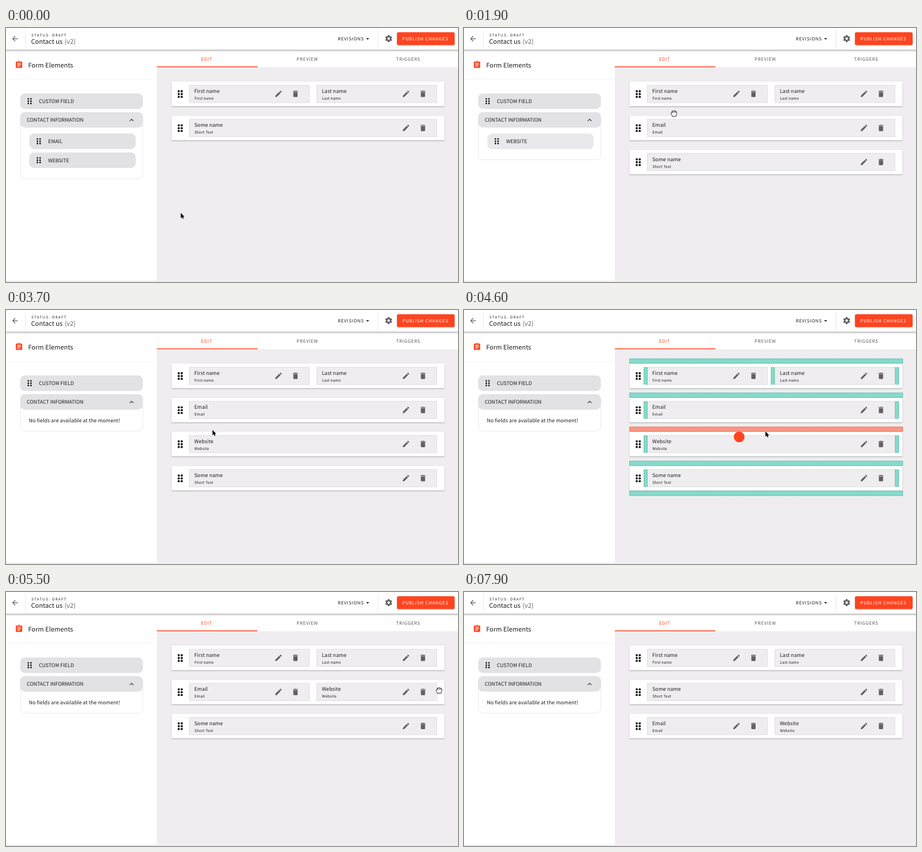
An HTML page with a canvas that plays this animation: 800x450 px, repeating every 8000 ms.

```html
<!DOCTYPE html>
<html lang="en">
<head>
<meta charset="utf-8">
<title>Form builder</title>
<style>
  html, body { margin: 0; height: 100%; overflow: hidden; }
  canvas { display: block; width: 800px; height: 450px; }
</style>
</head>
<body>
<canvas id="stage" width="800" height="450"></canvas>
<script>
const LOOP = 8000, STEP = 100;
const INK = '#1b1b1b', GREY = '#616161', RED = '#ff441f', PILL = '#e2e1e3', PAGE = '#efedef';
const FONT = '"Noto Sans CJK JP", "Noto Sans CJK SC", "Noto Sans CJK", "Noto Sans", sans-serif';
const ctx = document.getElementById('stage').getContext('2d');

const ICONS = {
  back: 'M20 11H7.83l5.59-5.59L12 4l-8 8 8 8 1.41-1.41L7.83 13H20v-2z',
  pencil: 'M3 17.25V21h3.75L17.81 9.94l-3.75-3.75L3 17.25zM20.71 7.04c.39-.39.39-1.02 0-1.41l-2.34-2.34c-.39-.39-1.02-.39-1.41 0l-1.83 1.83 3.75 3.75 1.83-1.83z',
  trash: 'M6 19c0 1.1.9 2 2 2h8c1.1 0 2-.9 2-2V7H6v12zM19 4h-3.5l-1-1h-5l-1 1H5v2h14V4z',
  form: 'M19 3h-4.18C14.4 1.84 13.3 1 12 1s-2.4.84-2.82 2H5c-1.1 0-2 .9-2 2v14c0 1.1.9 2 2 2h14c1.1 0 2-.9 2-2V5c0-1.1-.9-2-2-2zm-7 0c.55 0 1 .45 1 1s-.45 1-1 1-1-.45-1-1 .45-1 1-1zm2 14H7v-2h7v2zm3-4H7v-2h10v2zm0-4H7V7h10v2z',
  up: 'M12 8l-6 6 1.41 1.41L12 10.83l4.59 4.58L18 14z',
  down: 'M7 10l5 5 5-5z'
};
for (const k in ICONS) ICONS[k] = new Path2D(ICONS[k]);
const ARROW = new Path2D('M0 0V9.4L2.1 7.5L3.6 10.8L5.2 10.1L3.8 6.9H6.6Z');
const HAND = new Path2D('M-3 5.4C-3 3.5-5.5 1.5-5.3-.3C-5-1.4-4-1.2-3.3-.5L-3.6-3C-3.5-4.4-1.9-4.4-1.6-3.5C-1.4-5 .5-5 .8-3.8C1-4.8 2.8-4.6 2.8-3.2C3.4-3.9 4.8-3.4 4.8-2C4.9 1 4.5 2 3.6 5.4Z');
const KNUCKLES = new Path2D('M-1.6-3.3V-1M.8-3.6V-1M2.8-3.1V-1');

// Cursor way points: time, x, y
const PATH = [
  [0, 309.3, 327.5], [700, 88, 200], [900, 88, 201], [1800, 371, 150], [2000, 371, 150],
  [2500, 88, 200], [2800, 88, 201], [3500, 365.5, 212.5], [3800, 365.5, 212.5],
  [4300, 462, 236], [4400, 462, 235], [4500, 487, 222], [4600, 533.5, 215],
  [5200, 781, 176], [5400, 766, 173], [5600, 766, 173], [6200, 309, 236], [6300, 309, 236],
  [6400, 310.5, 188], [6500, 311, 186.5], [6800, 311, 151], [7400, 311, 151], [7800, 313, 172]
];
// Drags: start, drop, whole row?
const DRAGS = [[800, 1900], [2600, 3600], [4400, 5500], [6400, 7300, true]];

const lerp = (a, b, k) => a + (b - a) * k;

function cursorAt(t) {
  const i = PATH.findIndex(p => p[0] > t);
  if (i < 0) return PATH[PATH.length - 1].slice(1);
  if (i === 0) return PATH[0].slice(1);
  const a = PATH[i - 1], b = PATH[i];
  let k = (t - a[0]) / (b[0] - a[0]);
  if (b[0] - a[0] > 300) k = k * k * (3 - 2 * k);
  return [lerp(a[1], b[1], k), lerp(a[2], b[2], k)];
}

function rowsAt(t) {
  const name = [['First name'], ['Last name']], some = [['Some name', 'Short Text']];
  const email = ['Email'], site = ['Website'];
  if (t < 1900) return [name, some];
  if (t < 3600) return [name, [email], some];
  if (t < 5500) return [name, [email], [site], some];
  return t < 7300 ? [name, [email, site], some] : [name, some, [email, site]];
}

function rect(x, y, w, h, color, r = 0) {
  ctx.beginPath();
  ctx.roundRect(x, y, w, h, r);
  ctx.fillStyle = color;
  ctx.fill();
}

function outline(x, y, w, h, color, r = 0) {
  ctx.beginPath();
  ctx.roundRect(x, y, w, h, r);
  ctx.strokeStyle = color;
  ctx.lineWidth = 0.8;
  ctx.stroke();
}

function disc(x, y, r, color) {
  ctx.beginPath();
  ctx.arc(x, y, r, 0, 7);
  ctx.fillStyle = color;
  ctx.fill();
}

function shadow(blur, dy, color, draw) {
  ctx.save();
  ctx.shadowBlur = blur;
  ctx.shadowOffsetY = dy;
  ctx.shadowColor = color;
  draw();
  ctx.restore();
}

function text(s, x, y, size = 10, color = INK, gap = 0, weight = 400) {
  ctx.font = `${weight} ${size / 1.118}px ${FONT}`;
  ctx.letterSpacing = gap + 'px';
  ctx.textRendering = 'geometricPrecision';
  ctx.fillStyle = color;
  ctx.fillText(s, x, y);
}

const button = (s, x, y, color) => text(s, x, y, 8.75, color, 0.78, 500);

function icon(name, x, y, color = GREY, scale = 0.625) {
  ctx.save();
  ctx.translate(x, y);
  ctx.scale(scale, scale);
  ctx.translate(-12, -12);
  ctx.fillStyle = color;
  ctx.fill(ICONS[name]);
  ctx.restore();
}

function gear(x, y) {
  ctx.save();
  ctx.translate(x, y);
  for (let i = 0; i < 6; i++) {
    rect(-1.7, -6.2, 3.4, 4, GREY, 0.5);
    ctx.rotate(Math.PI / 3);
  }
  disc(0, 0, 4.7, GREY);
  disc(0, 0, 2.2, '#fff');
  ctx.restore();
}

function grip(x, y, dx, dy, r) {
  for (let i = 0; i < 6; i++) disc(x + (i % 2 - 0.5) * dx, y + ((i >> 1) - 1) * dy, r, '#111');
}

function pill(label, x, y, w, color = PILL) {
  rect(x, y, w, 27.4, color, 8.5);
  grip(x + 16.8, y + 13.7, 4.7, 4.1, 1.45);
  text(label, x + 33.2, y + 17.2);
}

function header() {
  shadow(3, 1, 'rgba(0,0,0,.35)', () => rect(-5, -5, 810, 43.5, '#fff'));
  icon('back', 16, 19);
  rect(34, 4, 0.8, 31, '#e2e2e2');
  text('STATUS: DRAFT', 45, 14.8, 7, INK, 1.4);
  text('Contact us', 44.4, 28, 12.5, INK, 0.05);
  text('(v2)', 103.5, 28, 12.5, '#666', 0.05);
  button('REVISIONS', 587.2, 22, INK);
  icon('down', 640, 19.2, INK, 0.55);
  rect(658.2, 4, 0.8, 31, '#e2e2e2');
  gear(677.3, 18.8);
  shadow(2, 1, 'rgba(0,0,0,.35)', () => rect(692, 7.5, 102, 22.5, RED, 2.5));
  button('PUBLISH CHANGES', 701.4, 22, '#fff');
}

function sidebar(t) {
  rect(0, 39, 267, 408.5, '#fff');
  rect(0, 90.7, 267, 0.8, '#efeff1');
  icon('form', 23, 65, RED);
  text('Form Elements', 39.2, 69.5, 12.5, INK, 0.09);
  pill('CUSTOM FIELD', 25, 116, 217.4);

  const items = t < 1900 ? ['EMAIL', 'WEBSITE'] : t < 3600 ? ['WEBSITE'] : [];
  const bottom = items.length ? 200 + 33.5 * items.length : 214.5;
  outline(25.4, 149.6, 216.8, bottom - 149.6, '#e4e4e8', 8.5);
  rect(25, 149.2, 217.4, 27.4, PILL, 8.5);
  text('CONTACT INFORMATION', 36.8, 166.3, 9.95);
  icon('up', 222.3, 163.2, '#333');
  const held = t >= 800 && t < 2000 || t >= 2600;
  items.forEach((s, i) => pill(s, 41.2, 187 + 33.5 * i, 188.3, held && !i ? '#e9e8ea' : PILL));
  if (!items.length) text('No fields are available at the moment!', 40.4, 198.5, 10, INK, 0.094);
}

function tabs() {
  rect(267, 39, 533, 30.5, '#fff');
  button('EDIT', 345.2, 58, RED);
  button('PREVIEW', 514.3, 58, '#555');
  button('TRIGGERS', 690.5, 58, '#555');
  rect(267, 68, 178, 1.4, RED);
}

function field([title, caption = title], x, y, w) {
  rect(x, y, w, 31.5, PAGE);
  outline(x + 0.4, y + 0.4, w - 0.8, 30.7, '#dcdadd');
  text(title, x + 9.2, y + 14, 10, INK, 0.094);
  text(caption, x + 9.5, y + 26, 7.4, INK, 0.2, 500);
  icon('pencil', x + w - 55, y + 15.6);
  icon('trash', x + w - 25, y + 15.6);
}

function zone(x, y, w, h, [cx, cy]) {
  const hot = cx >= x && cx <= x + w && cy >= y && cy <= y + h;
  rect(x, y, w, h, hot ? '#fb9483' : '#86dacb');
  ctx.setLineDash([1.9, 1.3]);
  outline(x + 0.4, y + 0.4, w - 0.8, h - 0.8, hot ? '#d9604c' : '#3fa998');
  ctx.setLineDash([]);
}

function row(fields, i, last, drag, cursor) {
  const y = 95 + 60.4 * i, pair = fields.length > 1;
  ctx.globalAlpha = drag && drag[2] && last ? 0.4 : 1;
  shadow(2, 1, 'rgba(0,0,0,.3)', () => rect(293, y, 483, 43.5, '#fff', 1));
  grip(308.4, y + 22, 5.3, 5, 1.95);
  fields.forEach((f, k) => field(f, 324 + 225.7 * k, y + 6, pair ? 213.3 : 439));
  if (drag) {
    zone(292.7, y - 9, 484.3, 9, cursor);
    if (last) zone(292.7, y + 44, 484.3, 9, cursor);
    if (!drag[2]) {
      fields.forEach((f, k) => zone(318 + 225.2 * k, y + 6.5, 6.8, 30.5, cursor));
      zone(763, y + 6.5, 6.8, 30.5, cursor);
    }
  }
  ctx.globalAlpha = 1;
}

function pointer(t, [x, y]) {
  if (t >= 7800) return;
  const hand = DRAGS.some(d => t >= d[1] && t < d[1] + (d[2] ? 200 : 100));
  ctx.save();
  ctx.translate(x, y);
  ctx.lineJoin = 'round';
  ctx.lineWidth = 1;
  if (hand) {
    ctx.translate(0.5, 1);
    ctx.fillStyle = '#fff';
    ctx.strokeStyle = '#222';
    ctx.fill(HAND);
    ctx.stroke(HAND);
    ctx.stroke(KNUCKLES);
  } else {
    ctx.fillStyle = '#000';
    ctx.strokeStyle = '#fff';
    ctx.stroke(ARROW);
    ctx.fill(ARROW);
  }
  ctx.restore();
}

function draw(t) {
  const cursor = cursorAt(t), rows = rowsAt(t);
  const drag = DRAGS.find(d => t >= d[0] && t < d[1]);
  rect(0, 0, 800, 450, PAGE);
  sidebar(t);
  tabs();
  header();
  rows.forEach((f, i) => row(f, i, i === rows.length - 1, drag, cursor));
  if (drag) {
    // The drag image trails the cursor by one step
    const [x, y] = cursorAt(Math.max(drag[0], t - STEP));
    disc(x, y + 2.8, 9.5, RED);
  }
  pointer(t, cursor);
}

function tick() {
  const t = performance.now() % LOOP;
  draw(Math.floor(t / STEP) * STEP);
  requestAnimationFrame(tick);
}
tick();
</script>
</body>
</html>
```
